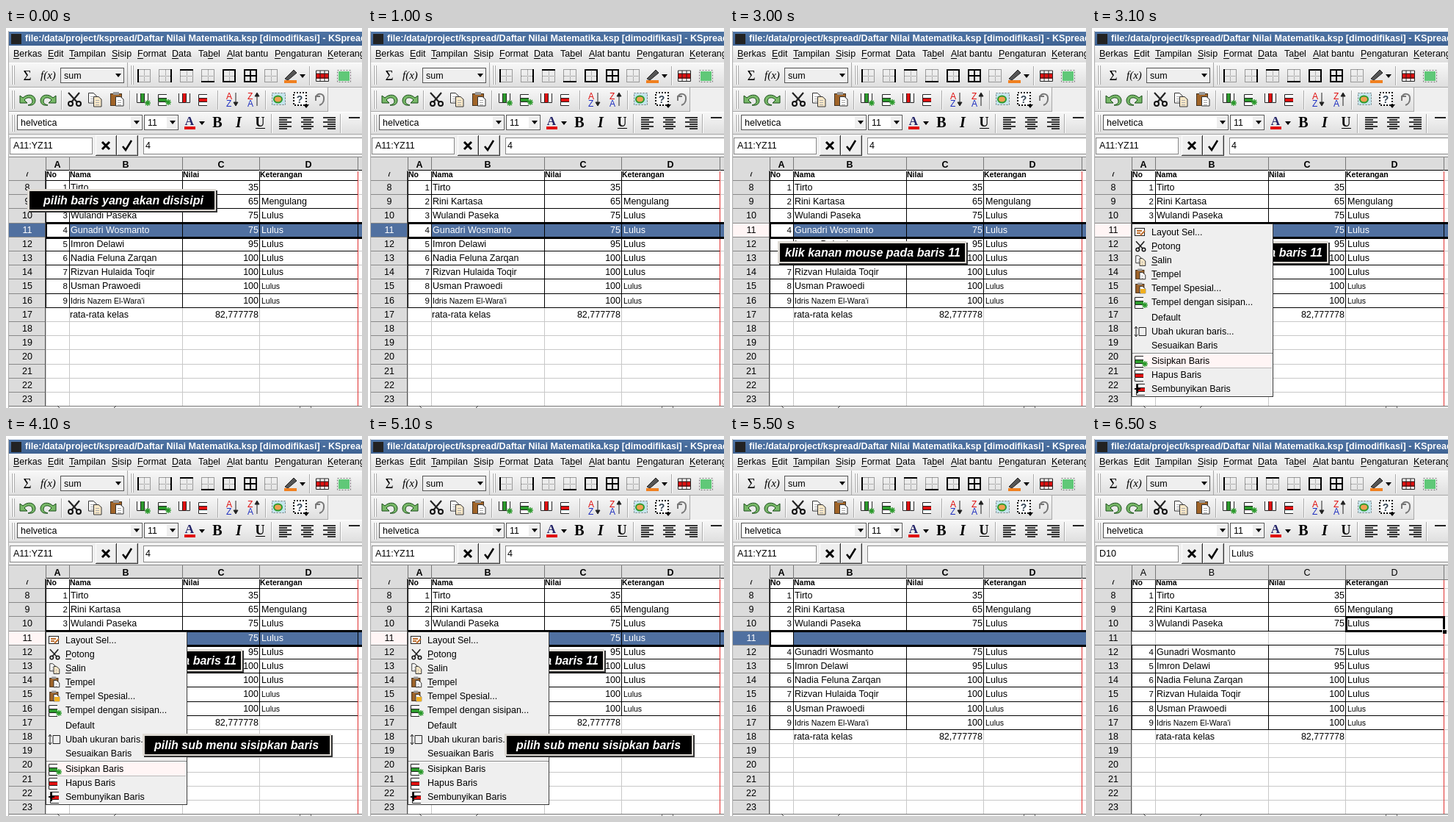
These frames come from a looping animation (485x517 px, 8500 ms). An HTML page with a canvas:

```html
<!DOCTYPE html>
<html lang="id">
<head>
<meta charset="utf-8">
<style>
html, body { margin: 0; width: 100%; height: 100%; overflow: hidden; background: #fff; }
canvas { display: block; }
</style>
</head>
<body>
<canvas id="stage" width="485" height="517"></canvas>
<script>
const g = document.getElementById('stage').getContext('2d');
const SANS = '"Liberation Sans", Arial, sans-serif';
const SERIF = '"Liberation Serif", Times, serif';
const BODY = '12.5px ' + SANS, SMALL = '10.5px ' + SANS, BOLD = 'bold 12.5px ' + SANS;
const FACE = '#efefef', HEAD = '#dcdcdc', BLUE = '#5070a0', PALE = '#fff5f5', GREEN = '#2c9a2c', RED = '#e01010';
const LOOP = 8500;

const names = ['Tirto', 'Rini Kartasa', 'Wulandi Paseka', 'Gunadri Wosmanto', 'Imron Delawi',
  'Nadia Feluna Zarqan', 'Rizvan Hulaida Toqir', 'Usman Prawoedi', "Idris Nazem El-Wara'i"];
const scores = [35, 65, 75, 75, 95, 100, 100, 100, 100];
const cols = [54, 86, 240, 345, 479];
const rowY = r => Math.floor(207.5 + 19.2 * (r - 8));

function box(x, y, w, h, color) {
  g.fillStyle = color;
  g.fillRect(x, y, w, h);
}
function shade(x, y, w, h, top, bottom) {
  const fill = g.createLinearGradient(0, y, 0, y + h);
  fill.addColorStop(0, top);
  fill.addColorStop(1, bottom);
  box(x, y, w, h, fill);
}
function frame(x, y, w, h, color, line = 1) {
  g.strokeStyle = color;
  g.lineWidth = line;
  g.strokeRect(x + line / 2, y + line / 2, w - line, h - line);
}
function text(s, x, y, font = BODY, color = '#000', align = 'left') {
  g.font = font;
  g.fillStyle = color;
  g.textAlign = align;
  g.fillText(s, x, y);
}
// Draws text with one underlined letter
function label(s, x, y, key) {
  text(s, x, y);
  if (key >= 0) box(Math.round(x + g.measureText(s.slice(0, key)).width), y + 2, Math.round(g.measureText(s[key]).width), 1, '#000');
}
function path(x, y, d, stroke, fill, line = 1) {
  const p = new Path2D(d);
  g.save();
  g.translate(x, y);
  g.lineWidth = line;
  if (fill) { g.fillStyle = fill; g.fill(p); }
  if (stroke) { g.strokeStyle = stroke; g.stroke(p); }
  g.restore();
}
function bevel(x, y, w, h) {
  box(x, y, w, h, '#333');
  box(x, y, w - 1, h - 1, '#fff');
  box(x + 1, y + 1, w - 2, h - 2, '#aaa');
  box(x + 1, y + 1, w - 3, h - 3, FACE);
}
const arrow = (x, y) => path(x, y, 'M-4 -2H4L0 3Z', null, '#000');
const divider = (x, y) => { box(x, y, 1, 26, '#aaa'); box(x + 1, y, 1, 26, '#fff'); };

function combo(x, y, w, s, fill = '#fff') {
  box(x, y, w, 21, fill);
  frame(x, y, w, 21, '#555');
  box(x + w - 16, y + 2, 14, 17, FACE);
  arrow(x + w - 8, y + 10);
  text(s, x + 5, y + 15);
}
// Toolbar background with a grip at its left end
function strip(x, y, w, h) {
  shade(x, y, w, h, '#f8f8f8', '#dedede');
  box(x, y, w, 1, '#fff');
  box(x, y + h - 1, w, 1, '#a8a8a8');
  box(x + w - 1, y, 1, h, '#a8a8a8');
  for (const i of [3, 6]) {
    box(x + i, y + 4, 1, h - 8, '#fff');
    box(x + i + 1, y + 4, 1, h - 8, '#aaa');
  }
}

// Icons, each centred on x, y
function borderIcon(x, y, sides) {
  frame(x - 9, y - 9, 18, 18, '#999');
  g.setLineDash([1, 1]);
  path(x, y, 'M-8 .5H8M.5 -8V8', '#777');
  g.setLineDash([]);
  const lines = { l: [-9, -9, 2, 18], r: [7, -9, 2, 18], t: [-9, -9, 18, 2], b: [-9, 7, 18, 2], h: [-9, -1, 18, 2], v: [-1, -9, 2, 18] };
  for (const s of sides) {
    const [a, b, w, h] = lines[s];
    box(x + a, y + b, w, h, '#000');
  }
}
function scissors(x, y, k = 1) {
  g.save();
  g.translate(x, y);
  g.scale(k, k);
  path(0, 0, 'M-8 -9L4 4M7 -9L-4 4', '#222', null, 2.2);
  path(0, 0, 'M-2 6a3 3 0 1 1 -6 0a3 3 0 1 1 6 0M9 6a3 3 0 1 1 -6 0a3 3 0 1 1 6 0', '#111', null, 2);
  g.restore();
}
function sheet(x, y, w, h, tint = '#fff') {
  path(x, y, `M.5 .5H${w - 4}L${w} 4V${h}H.5Z`, '#333', tint);
  for (let i = 5; i < h - 1; i += 3) box(x + 3, y + i, w - 6, 1, '#aaa');
}
function copy(x, y, k = 1) {
  sheet(x - 9 * k, y - 9 * k, 11 * k, 14 * k);
  sheet(x - 2 * k, y - 4 * k, 11 * k, 14 * k, '#f8e8c8');
}
function paste(x, y, k = 1) {
  box(x - 9 * k, y - 8 * k, 16 * k, 17 * k, '#a06428');
  frame(x - 9 * k, y - 8 * k, 16 * k, 17 * k, '#432');
  box(x - 5 * k, y - 10 * k, 8 * k, 4 * k, '#999');
  sheet(x - 2 * k, y - 4 * k, 11 * k, 13 * k);
}
function turn(x, y, dir) {
  g.save();
  g.translate(x, y);
  g.scale(dir, 1);
  path(0, 0, 'M-10 -5V5H0L-4 1C0 -4 7 -3 7 3C7 6 4 7 1 8C8 9 11 6 11 1C10 -7 0 -8 -6 -2Z', '#164d16', '#78b868');
  g.restore();
}
const plus = (x, y) => path(x, y, 'M-4 0H4M0 -4V4M-3 -3L3 3M3 -3L-3 3', GREEN, null, 1.5);
function columnIcon(x, y, color) {
  for (const i of [-9, -4, 1]) {
    box(x + i, y - 8, 5, 13, i === -4 ? color : '#fff');
    path(x + i, y - 8, 'M.5 0V12.5H5.5V0', '#222');
  }
  if (color === GREEN) plus(x + 6, y + 5);
}
function rowIcon(x, y, color) {
  for (const i of [-7, -2, 3]) {
    box(x - 8, y + i, 12, 5, i === -2 ? color : '#fff');
    path(x - 8, y + i, 'M12 .5H.5V5.5H12', '#222');
  }
  if (color === GREEN) plus(x + 6, y + 4);
}
function sortIcon(x, y, top, bottom, dir) {
  text(top, x - 8, y, '12px ' + SANS, RED);
  text(bottom, x - 8, y + 10, '12px ' + SANS, '#2030c0');
  path(x + 5, y, dir > 0 ? 'M0 -9V6M-3 4L0 9L3 4Z' : 'M0 9V-6M-3 -4L0 -9L3 -4Z', '#222', '#222');
}
function alignIcon(x, y, shift) {
  for (let i = 0; i < 6; i++) {
    const w = i % 2 ? 11 : 17;
    box(x - 8 + Math.round((17 - w) * shift), y - 8 + i * 3, w, 2, '#333');
  }
}

function toolbars() {
  box(0, 0, 485, 517, FACE);
  box(0, 0, 485, 5, '#fff');
  box(0, 0, 3, 517, '#fff');
  box(3, 4, 1, 513, '#aaa');
  shade(4, 5, 481, 19, '#4f74a4', '#3e6292');
  box(7, 8, 14, 14, '#222');
  text('file:/data/project/kspread/Daftar Nilai Matematika.ksp [dimodifikasi] - KSpread', 26, 18, 'bold 12.6px ' + SANS, '#fff');

  shade(4, 24, 481, 23, '#f8f8f8', '#dedede');
  [['Berkas', 10, 0], ['Edit', 57, 0], ['Tampilan', 86, 0], ['Sisip', 144, 0], ['Format', 179, 0], ['Data', 226, 0],
    ['Tabel', 262, 2], ['Alat bantu', 301, 0], ['Pengaturan', 366, 0], ['Keterangan', 438, 0]]
    .forEach(([s, x, key]) => label(s, x, 39, key));

  strip(4, 47, 162, 34);
  strip(166, 47, 320, 34);
  strip(4, 81, 435, 33);
  strip(4, 114, 482, 31);

  text('Σ', 29, 71, '19px ' + SERIF, '#000', 'center');
  text('f(x)', 47, 69, 'italic 15px ' + SERIF);
  combo(74, 54, 87, 'sum', FACE);
  ['l', 'r', 't', 'b', 'lrtb', 'lrtbhv', ''].forEach((s, i) => borderIcon(Math.round(188 + i * 28.9), 65, s));
  path(388, 65, 'M-8 4L4 -8L8 -4L-4 6Z', '#222', '#555');
  box(379, 71, 17, 4, '#f08020');
  arrow(404, 65);
  divider(413, 52);
  box(422, 58, 18, 15, '#fff');
  box(422, 62, 18, 7, RED);
  path(431, 65, 'M-8.5 -7H8.5V7.5H-8.5ZM-3 -7V7M3 -7V7M-8 -3H8M-8 3H8', '#222');
  box(453, 59, 15, 13, '#60c878');
  g.setLineDash([2, 2]);
  frame(451, 57, 19, 17, '#777');
  g.setLineDash([]);

  turn(29, 97, 1);
  turn(58, 97, -1);
  divider(75, 85);
  scissors(93, 97);
  copy(121, 97);
  paste(151, 97);
  divider(168, 85);
  columnIcon(187, 97, GREEN);
  rowIcon(215, 97, GREEN);
  columnIcon(244, 97, RED);
  rowIcon(270, 97, RED);
  divider(288, 85);
  sortIcon(308, 97, 'A', 'Z', 1);
  sortIcon(337, 97, 'Z', 'A', -1);
  divider(353, 85);
  box(362, 88, 19, 17, '#c4e4ec');
  box(391, 87, 19, 19, '#fff');
  g.setLineDash([2, 2]);
  frame(362, 88, 19, 17, '#777');
  frame(391, 87, 19, 19, '#000', 2);
  g.setLineDash([]);
  path(371, 97, 'M-6 0a5 4 0 1 1 11 0a5 4 0 1 1 -11 0', GREEN, '#f0a050', 2);
  text('?', 400, 102, 'bold 14px ' + SANS, '#345', 'center');
  arrow(409, 106);
  path(428, 97, 'M-6 -3C-3 -10 6 -8 5 0C5 4 2 7 -1 8M-6 2V-4H0', '#777', null, 2);

  combo(15, 118, 171, 'helvetica');
  combo(188, 118, 47, '11');
  text('A', 250, 132, 'bold 17px ' + SERIF, '#226', 'center');
  box(243, 134, 15, 4, RED);
  arrow(267, 129);
  text('B', 288, 135, 'bold 20px ' + SERIF, '#000', 'center');
  text('I', 317, 135, 'italic bold 20px ' + SERIF, '#000', 'center');
  text('U', 346, 134, 'bold 18px ' + SERIF, '#000', 'center');
  box(340, 136, 13, 1, '#000');
  divider(361, 117);
  [0, .5, 1].forEach((s, i) => alignIcon(380 + i * 30, 129, s));
  divider(455, 117);
  box(467, 121, 15, 2, '#222');
}

function formulaBar(cell, value) {
  for (const [x, w] of [[5, 113], [187, 302]]) {
    box(x, 149, w, 23, '#fff');
    frame(x, 149, w, 23, '#888');
  }
  text(cell, 10, 164);
  text(value, 190, 164);
  bevel(122, 146, 29, 28);
  bevel(151, 146, 29, 28);
  path(136, 160, 'M-5 -5L5 5M5 -5L-5 5', '#000', null, 3);
  path(165, 160, 'M-6 1L-2 6L6 -7', '#000', null, 2.5);
}

function grid(s) {
  const last = s.inserted ? 18 : 17;
  box(4, 176, 481, 338, '#fff');
  for (let r = 8; r <= 23; r++) box(54, rowY(r), 431, 1, '#c8c8c8');
  for (const x of cols) {
    box(x, 195, 1, 319, '#c8c8c8');
    box(x, 195, 1, rowY(last) - 195, '#000');
  }
  for (let r = 8; r <= last; r++) box(54, rowY(r), 426, 1, '#000');
  if (s.done) for (const x of cols) box(x, rowY(11) + 1, 1, 18, '#c8c8c8');
  // Page edge
  box(cols[4], 195, 1, 319, '#e03030');

  if (!s.done) {
    box(87, 266, 398, 19, BLUE);
    if (!s.inserted) for (const x of cols.slice(2)) box(x, 266, 1, 19, '#000');
    box(54, 264, 431, 3, '#000');
    box(54, 284, 431, 3, '#000');
    box(54, 264, 2, 23, '#000');
  }

  ['No', 'Nama', 'Nilai', 'Keterangan'].forEach((t, i) => text(t, cols[i] + 1, 203, 'bold 10.5px ' + SANS));
  names.forEach((name, i) => {
    const y = rowY(8 + i + (s.inserted && i > 2)) + 14;
    const color = i === 3 && !s.inserted ? '#fff' : '#000';
    text(i + 1, 84, y, '11.5px ' + SANS, '#000', 'right');
    text(name, 88, y, i === 8 ? SMALL : BODY, color);
    text(scores[i], 344, y, BODY, color, 'right');
    if (i) text(i === 1 ? 'Mengulang' : 'Lulus', 348, y, i > 6 ? SMALL : BODY, color);
  });
  text('rata-rata kelas', 87, rowY(last) + 14);
  text('82,777778', 344, rowY(last) + 14, BODY, '#000', 'right');

  box(4, 176, 50, 338, HEAD);
  for (let r = 7; r <= 23; r++) {
    const y = rowY(r), hit = r === 11;
    if (hit) box(4, y, 50, 19, s.head);
    box(4, y, 50, 1, '#888');
    text(r, 29, y + 14, BODY, hit && s.head === BLUE ? '#fff' : '#000', 'center');
  }
  box(4, 176, 50, 20, HEAD);
  box(53, 176, 1, 338, '#555');

  const bottom = s.done ? 196 : 194;
  box(4, 176, 481, bottom - 176, HEAD);
  box(4, 175, 481, 1, '#888');
  box(54, bottom - 1, 431, 1, s.done ? '#777' : '#000');
  for (const x of cols) box(x, 176, 1, bottom - 176, '#777');
  'ABCD'.split('').forEach((c, i) => text(c, [70, 163, 293, 412][i], 190, s.done ? BODY : BOLD, '#000', 'center'));

  if (s.done) {
    frame(345, 245, 136, 22, '#000', 3);
    box(477, 263, 6, 6, '#fff');
    box(478, 264, 5, 5, '#000');
  }
  box(4, 514, 481, 3, FACE);
  box(4, 514, 481, 1, '#777');
  box(70, 515, 80, 2, '#fff');
  path(150, 514, 'M0 0L-3 3M-80 0L-77 3', '#333');
  frame(400, 514, 16, 5, '#666');
}

function menu(hot) {
  box(54, 266, 193, 236, '#333');
  box(55, 267, 191, 234, '#fff');
  box(56, 268, 189, 232, FACE);
  box(55, 442, 191, 1, '#888');
  box(55, 443, 191, 1, '#fff');
  if (hot) {
    box(56, 444, 189, 18, PALE);
    box(56, 462, 189, 1, '#bbb');
  }
  [['Layout Sel...', 278], ['Potong', 297, 0], ['Salin', 316, 0], ['Tempel', 335, 0], ['Tempel Spesial...', 354],
    ['Tempel dengan sisipan...', 373], ['Default', 394], ['Ubah ukuran baris...', 413], ['Sesuaikan Baris', 432],
    ['Sisipkan Baris', 453], ['Hapus Baris', 472], ['Sembunyikan Baris', 491]]
    .forEach(([s, y, key]) => label(s, 81, y + 4, key));

  box(58, 272, 14, 11, '#fff');
  frame(58, 272, 14, 11, '#222');
  path(66, 278, 'M-5 -2H2M-5 1H0M0 4L6 -2', '#c07030', null, 2);
  scissors(66, 297, .75);
  copy(66, 316, .75);
  paste(66, 335, .75);
  paste(66, 354, .75);
  box(66, 355, 7, 6, '#f0b020');
  rowIcon(66, 373, GREEN);
  path(66, 413, 'M-6 -6V6M-8 -4L-6 -7L-4 -4M-8 4L-6 7L-4 4M-2 -5.5H7.5V5.5H-2Z', '#222');
  rowIcon(66, 453, GREEN);
  rowIcon(66, 472, RED);
  rowIcon(68, 491, RED);
  path(60, 491, 'M-2 0H6M2 -6V6', '#000', null, 2);
}

function tip(s, x, y, tx) {
  box(x + 2, y + 2, 257, 30, '#333');
  box(x, y, 257, 30, '#dedad4');
  box(x + 3, y + 3, 252, 25, '#000');
  text(s, tx, y + 21, 'italic bold 16px ' + SANS, '#fff');
}

function draw(t) {
  const during = (a, b) => t >= a && t < b;
  // Blinks twice from the given start
  const blink = start => during(start, start + 100) || during(start + 200, start + 300);
  const done = t >= 6500, inserted = t >= 5500;
  const head = done ? HEAD : !during(2700, 5500) ? BLUE : blink(2700) ? HEAD : PALE;

  toolbars();
  formulaBar(done ? 'D10' : 'A11:YZ11', done ? 'Lulus' : inserted ? '' : '4');
  grid({ inserted, done, head });
  if (t < 1000) tip('pilih baris yang akan disisipi', 29, 219, 51);
  if (during(1700, 5500)) tip('klik kanan mouse pada baris 11', 65, 290, 75);
  if (during(3100, 5500)) menu(!blink(5100));
  if (during(4100, 5500)) tip('pilih sub menu sisipkan baris', 186, 405, 202);
}

let start;
function tick(now) {
  start ??= now;
  draw((now - start) % LOOP);
  requestAnimationFrame(tick);
}
requestAnimationFrame(tick);
</script>
</body>
</html>
```
